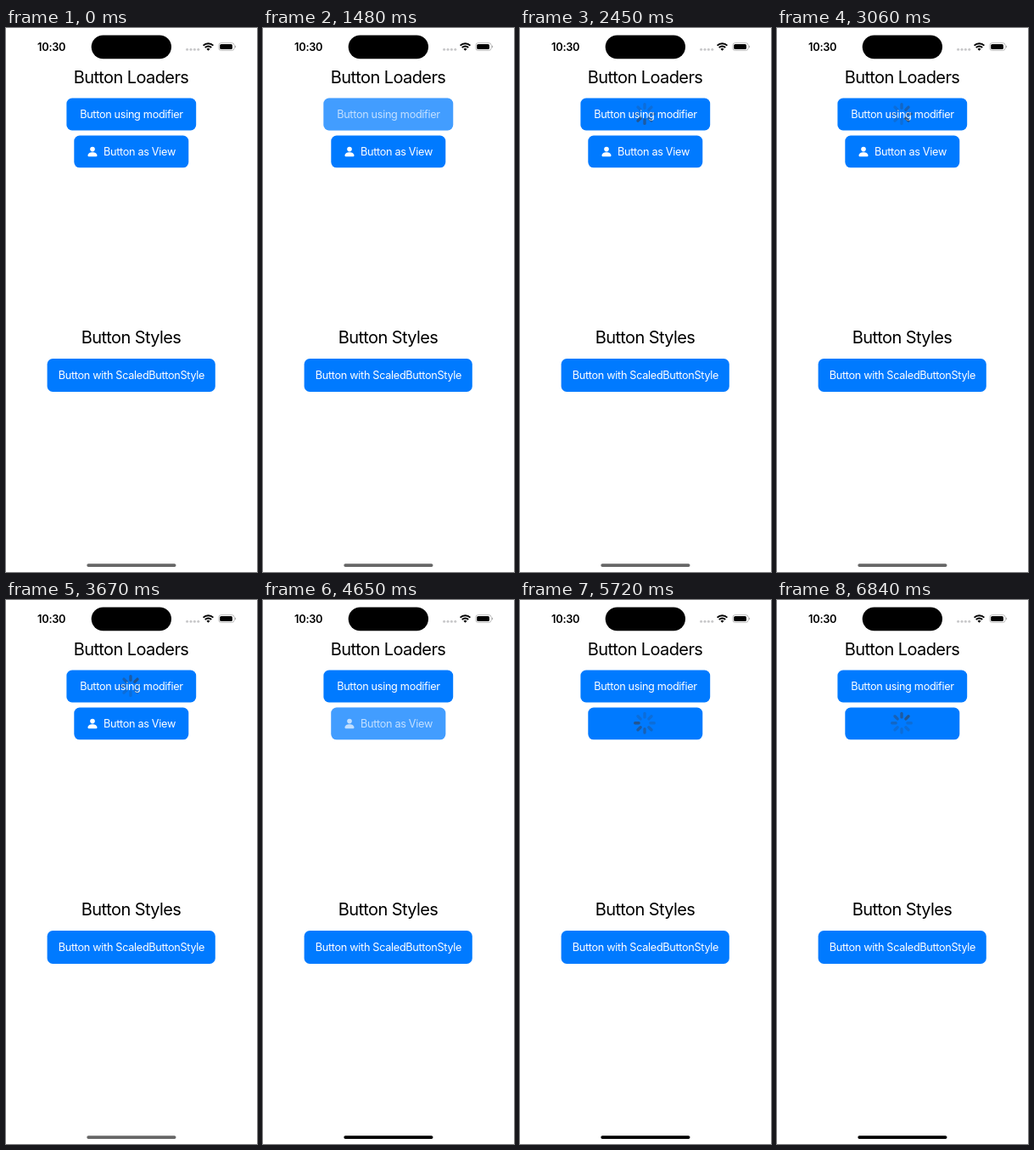
An HTML page that plays this animation: 296x640 px, repeating every 8 s.

```html
<!DOCTYPE html>
<html lang="en">
<head>
<meta charset="utf-8">
<title>Button loaders</title>
<style>
  html, body { margin: 0; width: 100%; height: 100%; overflow: hidden; background: #fff; }
  svg { display: block; width: 296px; height: 640px; }
  text { font-family: Inter, "Liberation Sans", sans-serif; text-anchor: middle; }
  .title { font-size: 20px; letter-spacing: -.03em; }
  .label { font-size: 12.7px; letter-spacing: -.025em; fill: #fff; }
  .clock { font-size: 12.8px; font-weight: 600; letter-spacing: -.02em; }
  .button { fill: #007aff; }
</style>
</head>
<body>
<svg viewBox="0 0 296 640">
  <rect width="296" height="640" fill="#fff"/>

  <text class="clock" x="53.7" y="26.6">10:30</text>
  <rect x="100.7" y="8.5" width="94.3" height="27.7" rx="13.85"/>
  <g fill="#c8c8ca">
    <circle cx="213.6" cy="25.3" r="1.5"/>
    <circle cx="218" cy="25.3" r="1.5"/>
    <circle cx="222.4" cy="25.3" r="1.5"/>
    <circle cx="226.8" cy="25.3" r="1.5"/>
  </g>
  <g fill="none" stroke="#000" stroke-width="1.9">
    <path d="M232.6 20.6a8.4 8.4 0 0 1 11.8 0"/>
    <path d="M234.8 23a5.2 5.2 0 0 1 7.4 0"/>
  </g>
  <path d="M236.5 24.7a2.9 2.9 0 0 1 4 0l-2 2.1z"/>
  <rect x="250.9" y="17.6" width="18.2" height="8.8" rx="2.7" fill="none" stroke="#aaa" stroke-width=".8"/>
  <rect x="252.2" y="18.9" width="14.8" height="6.2" rx="1.6"/>
  <path d="M270 20.6q1.2.4 1.2 1.4t-1.2 1.4z" fill="#aaa"/>

  <text class="title" x="147.5" y="64.6">Button Loaders</text>
  <rect class="button" x="71.4" y="82.6" width="152.8" height="37.8" rx="6.5"/>
  <rect id="tint1" x="71.4" y="82.6" width="152.8" height="37.8" rx="6.5" fill="#fff"/>
  <text id="label1" class="label" x="148" y="106.1">Button using modifier</text>
  <g id="spin1" transform="translate(147 101.1)"></g>

  <rect class="button" x="80.3" y="126.5" width="135" height="37.8" rx="6.5"/>
  <rect id="tint2" x="80.3" y="126.5" width="135" height="37.8" rx="6.5" fill="#fff"/>
  <g id="label2" fill="#fff">
    <circle cx="102" cy="142.6" r="2.8"/>
    <path d="M96.5 150c0-2.2 2.2-3.8 5.5-3.8s5.5 1.6 5.5 3.8q0 1.2-1.2 1.2h-8.6q-1.2 0-1.2-1.2z"/>
    <text class="label" x="157.5" y="150.1">Button as View</text>
  </g>
  <g id="spin2" transform="translate(147 144.8)"></g>

  <text class="title" x="147.5" y="370.6">Button Styles</text>
  <rect class="button" x="48.6" y="389" width="198.2" height="39" rx="6.5"/>
  <text class="label" x="148" y="413.2">Button with ScaledButtonStyle</text>

  <rect id="home" x="95.3" y="630.2" width="105.2" height="3.7" rx="1.85"/>
</svg>
<script>
  const LOOP = 8000;
  const STEP = 100;
  const TAIL = [.58, .49, .39, .3, .2, .2, .2, .2];
  // Runs of screen updates: first time, last time, count
  const RUNS = [
    [0, 0, 1], [1480, 1480, 1], [1630, 2300, 7], [2450, 3060, 7],
    [3210, 3520, 4], [3670, 4120, 5], [4650, 4650, 1], [4900, 5460, 6],
    [5610, 5930, 4], [6080, 6390, 4], [6540, 6840, 3]
  ];
  const updates = RUNS.flatMap(([from, to, n]) =>
    Array.from({ length: n }, (_, i) => from + (n > 1 ? (to - from) * i / (n - 1) : 0)));

  const $ = id => document.getElementById(id);
  const ramp = (t, from, to) => Math.min(1, Math.max(0, (t - from) / (to - from)));
  const ease = p => p * p * (3 - 2 * p);
  const fade = (t, from, to) => ease(ramp(t, from, to));

  function makeSpinner(id) {
    const group = $(id);
    const spokes = TAIL.map((_, i) => {
      const spoke = document.createElementNS("http://www.w3.org/2000/svg", "rect");
      const box = { x: -1.7, y: -13, width: 3.4, height: 7.8, rx: 1.7,
                    fill: "#3c3c43", transform: `rotate(${i * 45})` };
      for (const key in box) spoke.setAttribute(key, box[key]);
      group.append(spoke);
      return spoke;
    });
    return (t, opacity) => {
      const head = Math.floor((t - 5720) / STEP + 6.15);
      group.setAttribute("opacity", opacity);
      spokes.forEach((spoke, i) => {
        const age = (((head - i) % 8) + 8) % 8;
        spoke.setAttribute("opacity", TAIL[age]);
      });
    };
  }

  const spin1 = makeSpinner("spin1");
  const spin2 = makeSpinner("spin2");

  // 1 while held, easing back to 0 after release
  const pressed = (t, down, up) => t < down ? 0 : 1 - fade(t, up, up + 450);

  function draw(t) {
    const press1 = pressed(t, 1480, 1560);
    const press2 = pressed(t, 4650, 4830);
    const load1 = fade(t, 1600, 2000) * (1 - fade(t, 3680, 4080));
    const load2 = fade(t, 4840, 5240);

    $("tint1").setAttribute("opacity", .26 * press1);
    $("tint2").setAttribute("opacity", .26 * press2);
    $("label1").setAttribute("opacity", 1 - .32 * press1);
    $("label2").setAttribute("opacity", (1 - .32 * press2) * (1 - load2));
    spin1(t, load1);
    spin2(t, load2);

    const gray = Math.round(102 * (1 - fade(t, 3680, 4110)));
    $("home").setAttribute("fill", `rgb(${gray},${gray},${gray})`);
  }

  const start = performance.now();
  function tick() {
    const t = (performance.now() - start) % LOOP;
    draw(updates.findLast(u => u <= t + .5) ?? 0);
    requestAnimationFrame(tick);
  }
  tick();
</script>
</body>
</html>
```
